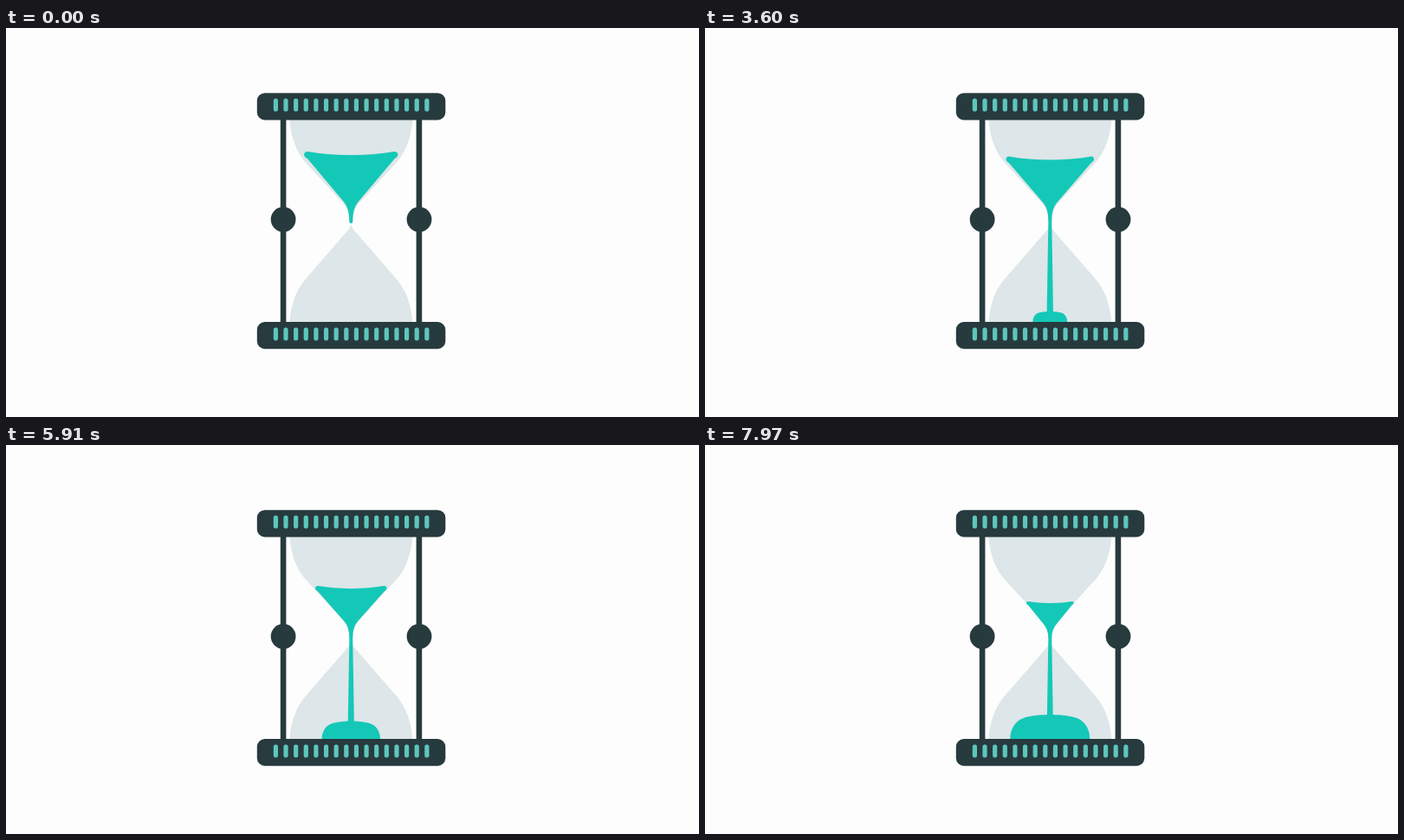
Write an HTML page that moves like this. It is 800 by 450 pixels and loops after 8 s.

```html
<!DOCTYPE html>
<html lang="en">
<head>
<meta charset="utf-8">
<title>Hourglass</title>
<style>
  html, body { margin: 0; width: 100%; height: 100%; overflow: hidden; background: #fdfdfd; }
  svg { display: block; width: 100%; height: 100%; }
  .frame { fill: #273a3e; }
  .glass { fill: #dde6e8; }
  .sand { fill: #14c8b7; }
  .notch { fill: #5dc6bc; }
</style>
</head>
<body>
<svg viewBox="0 0 800 450">
  <g transform="translate(398.3 0)">
    <path id="glass" class="glass"/>
    <path id="upper" class="sand"/>
    <path id="stream" class="sand"/>
    <path id="mound" class="sand" d="M-46 0C-46 -9 -42 -20 -31 -24C-22 -27.5 -8 -28 0 -28S22 -27.5 31 -24C42 -20 46 -9 46 0Z"/>
  </g>
  <g class="frame">
    <rect x="316.8" y="100" width="6.6" height="245"/>
    <rect x="473.6" y="100" width="6.6" height="245"/>
    <circle cx="320.1" cy="221.5" r="14.4"/>
    <circle cx="477" cy="221.5" r="14.4"/>
    <rect x="289.8" y="75.2" width="217.5" height="31.2" rx="9"/>
    <rect x="289.8" y="340" width="217.5" height="31.2" rx="9"/>
  </g>
  <g id="notches" class="notch"></g>
</svg>
<script>
const LOOP = 8000;
const FLOOR = 340;
const NECK = 222;
const LANDING = 600;
const DRAIN_START = 2540;
const find = id => document.getElementById(id);
const draw = (id, d) => find(id).setAttribute('d', d);
const lerp = (a, b, p) => a + (b - a) * p;

// One half of the glass; s = -1 reflects it below the neck.
function bulb(s, jointX, jointY, tipX, tipY) {
  const y = v => 223 + s * (v - 223);
  const bend = y(jointY + 1.15 * (jointX - tipX));
  return `M-71 ${y(106)}C-69 ${y(128)} -63 ${y(143)} -53 ${y(155)}L${-jointX} ${y(jointY)}` +
    `Q${-tipX} ${bend} ${-tipX} ${y(tipY)}H${tipX}Q${tipX} ${bend} ${jointX} ${y(jointY)}` +
    `L53 ${y(155)}C63 ${y(143)} 69 ${y(128)} 71 ${y(106)}Z`;
}
draw('glass', bulb(1, 8, 204, 2, 224) + bulb(-1, 4, 211.5, 0.6, 218));

let notches = '';
for (const y of [81.5, 346.5])
  for (let i = 0; i < 16; i++)
    notches += `<rect x="${308.8 + i * 11.63}" y="${y}" width="5.2" height="15" rx="2.6"/>`;
find('notches').innerHTML = notches;

// The sand drains at a constant rate, so its depth squared falls evenly.
function upperSand(t) {
  const depth = Math.sqrt(4900 - 0.714 * Math.max(0, t - DRAIN_START));
  const top = 213 - depth;
  const d = depth - 32;
  const w = 27.5 + 0.8 * d - 0.0035 * d * (d - 12);
  const k = w / 54.2, r = 5 * k, sag = top + 4 * k;
  const corner = w - 0.8 * r, low = top + 1.6 * r;
  const jointX = 8, jointY = 201.5 + (1 - k) * 10;
  return `M0 ${sag}Q${-w * 0.5} ${sag} ${r - w} ${top}` +
    `C${-w} ${top - 0.2 * r} ${-w - 0.4 * r} ${top + r} ${-corner} ${low}` +
    `L${-jointX} ${jointY}Q-1.9 ${jointY + 7} -1.9 ${NECK + 1}H1.9` +
    `Q1.9 ${jointY + 7} ${jointX} ${jointY}L${corner} ${low}` +
    `C${w + 0.4 * r} ${top + r} ${w} ${top - 0.2 * r} ${w - r} ${top}Q${w * 0.5} ${sag} 0 ${sag}Z`;
}

function stream(t) {
  const fall = Math.min(1, t / LANDING);
  const tip = lerp(226, FLOOR, fall * fall);
  const w = lerp(1.9, 3.8, (tip - NECK) / (FLOOR - NECK));
  return `M-1.9 ${NECK}L${-w} ${tip - w}Q${-w} ${tip} 0 ${tip}Q${w} ${tip} ${w} ${tip - w}L1.9 ${NECK}Z`;
}

function render(t) {
  const growth = Math.max(0, (t - 270) / 7700);
  draw('upper', upperSand(t));
  draw('stream', stream(t));
  find('mound').setAttribute('transform', `translate(0 ${FLOOR}) scale(${growth})`);
}

const start = performance.now();
function tick() {
  render((performance.now() - start) % LOOP);
  requestAnimationFrame(tick);
}
tick();
</script>
</body>
</html>
```
